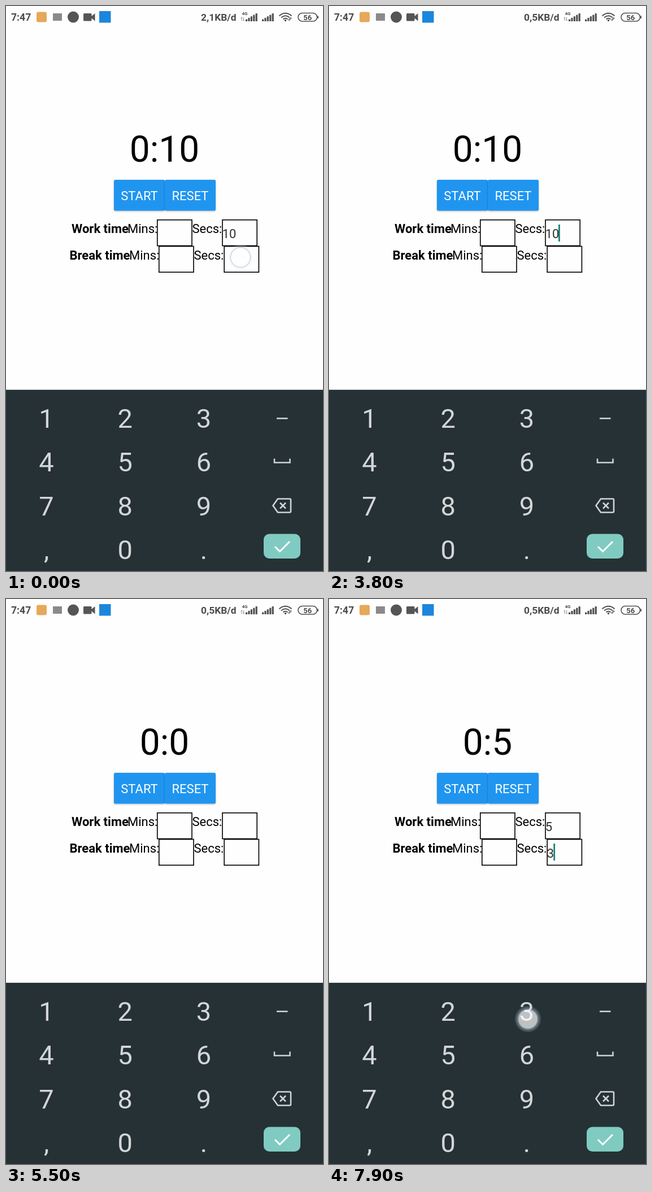
These frames come from a looping animation (561 px wide and 998 px high, 8000 ms). An HTML page:

```html
<!DOCTYPE html>
<html lang="en">
<head>
<meta charset="utf-8">
<title>Interval timer</title>
<style>
  html, body { margin: 0; width: 100%; height: 100%; overflow: hidden; background: #fefefe; }
  svg { display: block; width: 100%; height: 100%; font-family: Roboto, sans-serif; }
  .label { font-size: 22px; fill: #000; }
  .bold { font-weight: 700; }
  .value { font-size: 22px; fill: #303030; }
  .button rect { fill: #2095f0; filter: drop-shadow(0 1.5px 1.5px rgba(0, 0, 0, .3)); }
  .button text { font-size: 22px; fill: #fff; text-anchor: middle; }
  .field { fill: none; stroke: #0a0a0a; stroke-width: 1.7; }
  .status text { font-weight: 700; fill: #4a4a4a; }
  #keys text { font-size: 47px; fill: #d3d6d7; text-anchor: middle; }
  .icon { fill: none; stroke: #d0d4d5; stroke-width: 2.6; }
</style>
</head>
<body>
<svg viewBox="0 0 561 998" preserveAspectRatio="none">
  <defs>
    <radialGradient id="glow">
      <stop offset="0" stop-color="#fff" stop-opacity=".7"/>
      <stop offset=".68" stop-color="#fff" stop-opacity=".7"/>
      <stop offset=".73" stop-color="#93b4d4" stop-opacity=".62"/>
      <stop offset=".79" stop-color="#dce8f4" stop-opacity=".32"/>
      <stop offset="1" stop-color="#fff" stop-opacity="0"/>
    </radialGradient>
  </defs>
  <rect width="561" height="998" fill="#fefefe"/>

  <g class="status">
    <text x="9" y="26.3" font-size="17.6">7:47</text>
    <rect x="54" y="10.5" width="18" height="18" rx="3" fill="#e6a85a"/>
    <rect x="83" y="13" width="16" height="13" fill="#8a8a8a"/>
    <circle cx="119" cy="19.5" r="10" fill="#555"/>
    <path d="M138.500 13H150q1.500 0 1.500 1.500V18l6-5V26.500l-6-5V25q0 1.500-1.500 1.500H138.500q-1.500 0-1.500-1.500V14.500q0-1.500 1.500-1.500z" fill="#555"/>
    <rect x="165" y="9" width="20.500" height="20.500" fill="#1c86dc"/>
    <text id="speed" x="345" y="26.3" font-size="17.4"></text>
    <text x="417.500" y="16" font-size="8">4G</text>
    <path d="M417 26V20m-1.500 1.500L417 20l1.500 1.500M420.500 20v6m-1.500-1.500 1.500 1.500 1.500-1.500" fill="none" stroke="#777" stroke-width=".8"/>
    <g id="bars" fill="#505050"></g>
    <g fill="none" stroke="#505050" stroke-width="2">
      <path d="M483.500 17.500Q494.500 8 505.500 17.500M487 20.500Q494.500 14 502 20.500M490.500 23.500Q494.500 20 498.500 23.500"/>
      <path d="M500 25.500l5-5" stroke-width="3" stroke="#888"/>
      <rect x="517" y="12.500" width="33.500" height="14.500" rx="7.200" stroke-width="1.500"/>
      <path d="M552 17.500v4.500" stroke-width="1.800"/>
    </g>
    <circle cx="494.500" cy="25.500" r="1.700" fill="#505050"/>
    <text x="533.700" y="24.500" font-size="13" text-anchor="middle">56</text>
  </g>

  <text id="clock" x="280.500" y="275" font-size="64" text-anchor="middle"></text>

  <g class="button">
    <rect x="191" y="307" width="90" height="54.500" rx="2.500"/>
    <rect x="281" y="307" width="90" height="54.500" rx="2.500"/>
    <text x="236" y="343.300">START</text>
    <text x="326" y="343.300">RESET</text>
  </g>

  <g class="label">
    <text class="bold" x="116" y="401">Work time</text>
    <text x="215" y="401">Mins:</text>
    <text x="329.500" y="401">Secs:</text>
    <text class="bold" x="112.500" y="447.700">Break time</text>
    <text x="218" y="447.700">Mins:</text>
    <text x="332.500" y="447.700">Secs:</text>
  </g>
  <text class="value" id="work" x="382.700" y="409.700"></text>
  <text class="value" id="rest" x="385.700" y="456.700"></text>
  <rect id="caret" width="2.800" height="30" fill="#18837a"/>
  <g class="field">
    <rect x="267.800" y="377.800" width="61.200" height="45.700"/>
    <rect x="383" y="377.800" width="61.200" height="45.700"/>
    <rect x="270.800" y="424.500" width="61.200" height="45.700"/>
    <rect x="386.200" y="424.500" width="61.200" height="45.700"/>
  </g>

  <rect y="676" width="561" height="2" fill="#eceeee"/>
  <rect y="678" width="561" height="320" fill="#253135"/>
  <rect id="pressed" width="139" height="76" rx="2" fill="#fff" opacity=".1"/>
  <g id="keys"></g>
  <path class="icon" d="M479 728.500h19.500" stroke-width="3"/>
  <path class="icon" d="M475 799.500v7h27.500v-7"/>
  <path class="icon" d="M481 870.500h21q2 0 2 2v20q0 2-2 2h-21l-8.500-12zM485 877.500l10 10m0-10l-10 10"/>
  <rect x="456" y="932.500" width="65" height="43.500" rx="10" fill="#80cbc1"/>
  <path d="M476 955l8.500 8.500L502 946" fill="none" stroke="#fff" stroke-width="3"/>
  <circle id="touch" r="24" fill="url(#glow)"/>
</svg>
<script>
  const LOOP = 8000, TICK = 100, FADE = 300;
  const $ = id => document.getElementById(id);

  // Each track lists [start time, value]; values hold until the next step.
  const tracks = {
    speed: [[0, '2,1KB/d'], [600, '0,5KB/d']],
    clock: [[0, '0:10'], [4500, '0:1'], [4900, '0:0'], [5800, '0:5']],
    work: [[0, '10'], [4400, '1'], [4800, ''], [5700, '5']],
    rest: [[0, ''], [7900, '3']]
  };

  // The caret restarts its 500 ms blink at each focus or edit.
  const caretStarts = [
    [200, 387, 432], [2800, 406, 386], [4400, 394.3, 386],
    [4800, 384, 386], [5700, 394.3, 386], [6700, 387, 432], [7900, 397.3, 432]
  ];

  const taps = [
    { x: 415, y: 444, down: 0, up: 0, end: 300 },
    { x: 422, y: 401, down: 2700, up: 2800, end: 3100 },
    { x: 503, y: 854, down: 4200, up: 4300, end: 4600, key: [3, 2] },
    { x: 503, y: 854, down: 4600, up: 4700, end: 4900, key: [3, 2] },
    { x: 214, y: 812, down: 5600, up: 5700, end: 5900, key: [1, 1] },
    { x: 419, y: 444, down: 6400, up: 6500, end: 7500, residue: .12 },
    { x: 352, y: 742, down: 7700, up: 7900, end: 8000, key: [2, 0] }
  ];

  const svgNode = (parent, name, attrs, text = '') => {
    const node = document.createElementNS('http://www.w3.org/2000/svg', name);
    setAttrs(node, attrs);
    node.textContent = text;
    parent.append(node);
  };
  const setAttrs = (node, attrs) => {
    for (const key in attrs) node.setAttribute(key, attrs[key]);
  };
  const lastStep = (steps, t) => steps.filter(step => step[0] <= t).pop();

  ['123', '456', '789', ',0.'].forEach((row, r) =>
    [...row].forEach((char, c) =>
      svgNode($('keys'), 'text', { x: 71.5 + 139.2 * c, y: 744.7 + 77.4 * r }, char)));

  for (const left of [424, 453])
    for (let i = 0; i < 5; i++) {
      const height = 3.5 + 2.6 * i;
      svgNode($('bars'), 'rect', { x: left + 4.4 * i, y: 27 - height, width: 3.2, height });
    }

  function draw(t) {
    for (const id in tracks) {
      const value = lastStep(tracks[id], t)[1];
      if ($(id).textContent !== value) $(id).textContent = value;
    }

    const blink = lastStep(caretStarts, t);
    const caretOn = blink && (t - blink[0]) % 1000 < 500 && !(t >= 2700 && t < 2800);
    setAttrs($('caret'), { opacity: caretOn ? 1 : 0 });
    if (blink) setAttrs($('caret'), { x: blink[1], y: blink[2] });

    const tap = taps.find(p => t >= p.down && t < p.end);
    const alpha = tap ? Math.min(1, Math.max(1 - (t - tap.up) / FADE, tap.residue || 0)) : 0;
    setAttrs($('touch'), { opacity: alpha });
    if (tap) setAttrs($('touch'), { cx: tap.x, cy: tap.y });

    const key = tap && t < tap.up && tap.key;
    setAttrs($('pressed'), { opacity: key ? .1 : 0 });
    if (key) setAttrs($('pressed'), { x: 2 + 139 * key[0], y: 690 + 77 * key[1] });
  }

  const start = performance.now();
  function frame() {
    const t = (performance.now() - start) % LOOP;
    draw(Math.floor(t / TICK) * TICK);
    requestAnimationFrame(frame);
  }
  frame();
</script>
</body>
</html>
```
